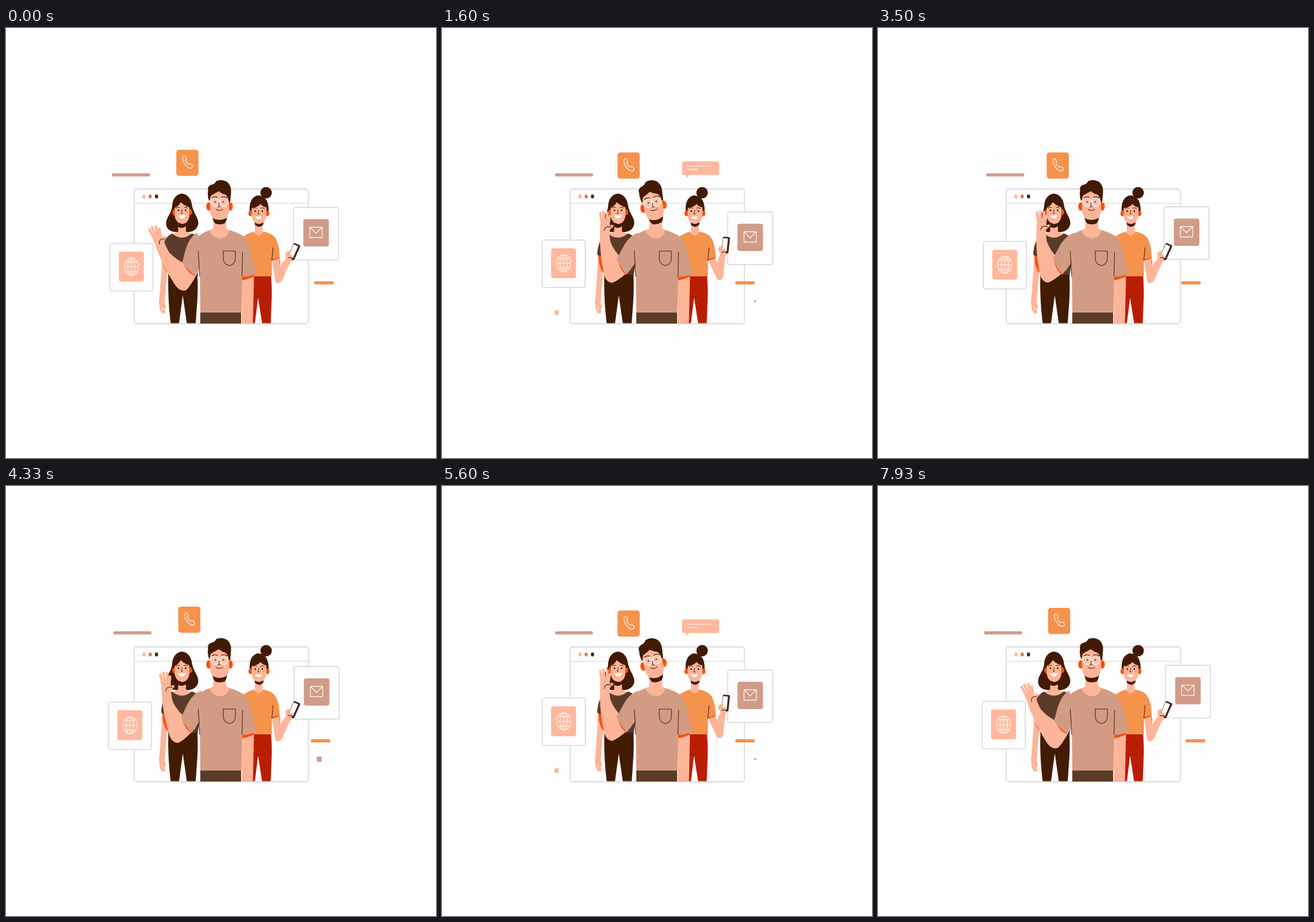
These frames come from a looping animation (748x748 px, 8.01 s). An HTML page:

```html
<!DOCTYPE html>
<html lang="en">
<head>
<meta charset="utf-8">
<title>Team greeting</title>
<style>
  html, body { margin: 0; width: 100%; height: 100%; overflow: hidden; background: #fefefe; }
  svg { display: block; width: 100vw; height: 100vh; }
  .skin { fill: #fdb599; }
  .hair { fill: #421a04; }
  .red { fill: #ff4e08; }
  .line { fill: none; stroke: #4a2412; stroke-width: 1.1; stroke-linecap: round; stroke-linejoin: round; }
  .white { fill: none; stroke: #fff3ec; stroke-width: 1.3; stroke-linecap: round; stroke-linejoin: round; }
  .limb { fill: none; stroke: #fdb599; stroke-linecap: round; stroke-linejoin: round; }
  .card { fill: #fdfdfd; stroke: #d3cfcf; stroke-width: 1.3; }
  .shirt { fill: #d29c84; }
  .top { fill: #5b3b2a; }
  .orange { fill: #f5924b; }
  .pants { fill: #ba1e02; }
  .pink { fill: #ffb89d; }
  .tan { fill: #d09c88; }
</style>
</head>
<body>
<svg viewBox="0 0 748 748">
  <!-- browser window -->
  <rect x="223" y="280" width="303" height="234.5" rx="4" fill="#fefefe" stroke="#d0cbcb" stroke-width="1.3"/>
  <path d="M223 305H526" stroke="#d8d0d0" stroke-width="1.2"/>
  <ellipse cx="240" cy="293" rx="2.8" ry="3.5" class="pink"/>
  <ellipse cx="250.8" cy="293" rx="2.8" ry="3.5" fill="#ee7740"/>
  <ellipse cx="261.8" cy="293" rx="2.8" ry="3.5" fill="#40261a"/>

  <!-- floating pieces -->
  <rect id="barL" y="252.8" width="66" height="5.4" rx="2" class="tan"/>
  <rect id="barR" y="440.5" width="34" height="5.4" rx="2" class="orange"/>
  <rect id="dotL" x="194.6" y="490" width="9.4" height="10.2" rx="2.5" class="pink"/>
  <rect id="dotR" x="540.7" y="470.5" width="8.4" height="9.6" class="tan"/>
  <g id="bubble">
    <path class="pink" d="M420 232H480Q482 232 482 234.500V253.500Q482 255.800 480 255.800H430L426 261L424.500 255.800H420Q417.500 255.800 417.500 253.500V234.500Q417.500 232 420 232Z"/>
    <path class="white" d="M426.500 240.300H469M426.500 246H443.500"/>
  </g>
  <g id="call">
    <rect width="38.500" height="45.500" rx="4.500" class="orange"/>
    <path class="white" d="M12.300 11Q10.200 13 11.200 17.500Q13.500 26.500 22 31.800Q25.800 33.500 28.300 30.300Q29.500 28.300 27.500 26.700L24.600 24.500Q23 23.700 21.600 25.800Q17.400 23 15.800 18.300Q18.200 17.100 17.100 14.900L15.500 11.800Q14 9.800 12.300 11Z"/>
  </g>
  <g id="mail">
    <rect class="card" width="78.500" height="91.500" rx="3.500"/>
    <rect x="17.200" y="20.600" width="44.400" height="47.400" rx="4" class="tan"/>
    <path class="white" d="M28.500 34.500H50V52.500H28.500ZL39.200 45L50 34.500"/>
  </g>

  <!-- woman on the left -->
  <g>
    <path class="hair" d="M306 288C296 289 290 297 289 309C289 322 278 329 278.500 341C279 350 287 355 297 355H318C328 354 335 347 334.500 338C334 329 325 320 323.500 308C322 296 315 289 306 288Z"/>
    <path class="skin" d="M299.500 334H313V354Q320 357 324 359Q306 371 288 359Q295 356 299.500 354Z"/>
    <path class="hair" d="M299.500 338H313V345Q306 350 299.500 346Z"/>
    <ellipse cx="292.500" cy="321" rx="3.400" ry="5" class="red"/>
    <ellipse cx="320.500" cy="320.500" rx="3.400" ry="5" class="red"/>
    <path class="skin" d="M293.500 313Q300 310 304 303Q310 309 319 312V327Q317 340 306.500 341Q295 339 293.500 327Z"/>
    <path class="line" d="M296.500 313Q299 310.800 302 312.500M310 312.500Q313 310.800 315.500 313M306.500 316L305 322.500H307"/>
    <circle cx="300" cy="317" r="1.500" class="hair"/><circle cx="312.500" cy="317" r="1.500" class="hair"/>
    <path d="M300 325.500Q306.500 327 312.500 325Q311 331.500 306.500 331.500Q302 331.500 300 325.500Z" fill="#fff"/>
    <path class="limb" stroke-width="10" d="M276 396L275.500 420L272.500 460L271 478"/>
    <path class="limb" stroke-width="3.800" d="M269 478L269 488L272 494.500M272 478L274 488L275.500 494.500M274 477L276.500 486"/>
    <path class="red" d="M272.500 396L279 400Q280 416 284 429Q276 423 273 408Z"/>
    <path class="top" d="M289 357.500Q306 372 323 357.500Q338 361 342 380L333 432H282.500Q283 414 280 398Q274 398 270 394Q271 366 289 357.500Z"/>
    <path d="M282.500 429H333Q334 450 333 470L330 513.500H314.500L307.500 465L301 513.500H286.500Q281 470 282.500 429Z" fill="#421b03"/>
    <path class="line" d="M279 388L281 402"/>
  </g>

  <!-- woman on the right -->
  <g>
    <path d="M424 430H461Q463 452 462 475L460.500 513.500H445.500L438.500 469L433 513.500H424Z" class="pants"/>
    <path d="M431 467.500H448" stroke="#8c1603" stroke-width="1"/>
    <path class="red" d="M470 398L475 398Q480 411 473.500 427Z"/>
    <path id="upperArm" class="limb" stroke-width="12.500"/>
    <path class="red" d="M462 399L475.500 395L475.500 400.500Q469 404 462 404.500Z"/>
    <path class="orange" d="M432 354H447Q466 357 471 370Q476 382 476 398Q469 402 462.500 402L462.500 432H412V364Q420 357 432 354Z"/>
    <path class="line" d="M464.500 382L462.500 404"/>
    <path class="skin" d="M433 336H446.500V354L448 355Q440 363 439 361Q434 359 430.500 355L433 354Z"/>
    <g id="head2">
      <circle cx="452.500" cy="286.500" r="10" class="hair"/>
      <path class="hair" d="M424 320Q422 297 436 291.500Q443 290 449 295Q457 300 457 320Z"/>
      <path class="hair" d="M432 333H447L448 341Q441 350 433 342Z"/>
      <ellipse cx="425.500" cy="322.500" rx="3.800" ry="5" class="red"/>
      <ellipse cx="454.500" cy="322.500" rx="3.800" ry="5" class="red"/>
      <path class="skin" d="M427.500 313Q438 312 443 306Q446 311 453 312V327Q451 340 440 341Q429 340 427.500 327Z"/>
      <path class="line" d="M430 314Q433 312 436 313.500M443 313.500Q446 312 449.500 314M439.500 317L438.500 323.500H440.500"/>
      <circle cx="433.500" cy="318.500" r="1.400" class="hair"/><circle cx="446" cy="318.500" r="1.400" class="hair"/>
      <path d="M429 318.500a4.500 5 0 1 0 9 0a4.500 5 0 1 0 -9 0M441.500 318.500a4.500 5 0 1 0 9 0a4.500 5 0 1 0 -9 0" fill="none" stroke="#f3a080" stroke-width=".7"/>
      <path d="M433.500 327.500Q439 329 445 327.500Q443.500 332.500 439.500 332.500Q435 332.500 433.500 327.500Z" fill="#fff"/>
    </g>
    <g id="phoneArm">
      <path class="skin" d="M467.500 438Q474 415 487 401L486 393Q489 387 494 388L501 397Q502 404 495 407Q488 420 482 436Q475 449 468 441Z"/>
      <g transform="rotate(24 501 389)">
        <rect x="494.800" y="374.800" width="12.400" height="28.400" rx="2" fill="#45291d"/>
        <rect x="495.400" y="377.500" width="8.400" height="22.500" rx=".6" fill="#fff"/>
      </g>
      <path class="limb" stroke-width="3.800" d="M488 392L494.500 390M489 397L496.500 396.500M491 402L495 402"/>
    </g>
  </g>

  <!-- man in front -->
  <g>
    <g id="wave">
      <path class="skin" d="M274.500 346Q273.500 370 276 393Q279 416 283 432Q287 443 296 444Q305 442 328 421L337 404L311 399Q300 390 292.500 372Q290 360 291.500 348Z"/>
      <ellipse cx="283" cy="346" rx="9" ry="9.500" class="skin"/>
      <path class="limb" stroke-width="4.600" d="M278 346L274.300 323M281.500 343L280 320.800M285 343L286.500 322M288 345L290.800 328M288 351.500L295 345"/>
      <path class="line" d="M281.500 353Q282.500 346.500 288 346L293.500 347"/>
    </g>
    <path class="skin" d="M410.500 428H431.500Q430.500 470 429.500 514H410Z"/>
    <path class="red" d="M410.500 430L432.500 426L430.500 433Q421 437 410.500 439Z"/>
    <path class="red" id="cuff" d="M305 399L309.500 399L322 422L319.500 429Q308 419 305 399Z"/>
    <path class="shirt" id="sleeve" d="M341 356Q325 362 315 381L304 402Q312 418 321 429L338 407L344 380Z"/>
    <path d="M338 490H409V514H338Z" fill="#5b3c28"/>
    <path class="shirt" d="M357 350.500Q371 354 386 350.500Q408 357 418 366Q426 380 435 428Q424 432.500 411 433L409.500 495H338L337 410L326 371Q337 357 357 350.500Z"/>
    <path class="line" d="M334.500 388L337 432M411.500 390L410.500 432"/>
    <path class="line" d="M378 388H399V402Q398 411 388.500 413.500Q379 411 378 402Z"/>
    <path class="skin" d="M360.500 330H383V348Q386 351 389 352Q385 365 372 366Q358 364 354 352Q360 350 360.500 348Z"/>
    <g id="head1">
      <ellipse cx="353" cy="310.500" rx="4.600" ry="7.300" class="red"/>
      <ellipse cx="390" cy="310.500" rx="4.600" ry="7.300" class="red"/>
      <path class="hair" d="M358 322H385Q385 335 380 340Q371 343 364 340Q359 335 358 322Z"/>
      <path class="skin" d="M355 284H388V318Q387 326 383 331Q371 337 360 331Q356 326 355 318Z"/>
      <path class="hair" d="M353 300Q350 291 351.500 283Q350 276 356 273Q363 272 366 266Q376 262 385 268Q392 274 391.500 285L390 303H387.500Q387 294 382 290Q375 288 370 284Q363 288 357 291Q354.500 295 354.500 300Z"/>
      <path class="hair" d="M358 295Q362 291.500 368 294L367.500 296Q362 294 358.500 297ZM374.500 294Q380 291.500 385 295L384.500 297Q380 294.500 375 296Z"/>
      <circle cx="364" cy="302.500" r="1.600" class="hair"/><circle cx="378" cy="302.500" r="1.600" class="hair"/>
      <path fill="#ffe4d8" fill-opacity=".3" stroke="#fbe9df" stroke-width="1.700" d="M356.500 302.800a7 7.600 0 1 0 14 0a7 7.600 0 1 0 -14 0M372 302.800a7 7.600 0 1 0 14 0a7 7.600 0 1 0 -14 0"/>
      <path class="line" d="M371 304L369.500 311H372.500M365.500 315.500Q371 319 377 315.500"/>
    </g>
  </g>

  <g id="globe">
    <rect class="card" width="75" height="82.500" rx="3.500"/>
    <rect x="15.500" y="14.300" width="43.500" height="52" rx="4" class="pink"/>
    <path class="white" d="M25 40.500a12.300 15 0 1 0 24.600 0a12.300 15 0 1 0 -24.600 0M31 40.500a6.300 15 0 1 0 12.600 0a6.300 15 0 1 0 -12.600 0M37.300 25.500V55.500M25 40.500H49.600M27.500 32H47M27.500 49H47"/>
  </g>
</svg>
<script>
  const LOOP = 8010, CYCLE = 80, TAU = Math.PI * 2;
  const el = id => document.getElementById(id);
  const set = (id, name, value) => el(id).setAttribute(name, value);
  const clamp = v => Math.min(1, Math.max(0, v));
  const smooth = v => { v = clamp(v); return v * v * (3 - 2 * v); };
  const bump = (n, a, b, c, d) => smooth((n - a) / (b - a)) * (1 - smooth((n - c) / (d - c)));

  // Elliptical drift: centre plus cosine and sine weights for each axis.
  const drifts = {
    call: [299.6, -3.3, 5.4, 216, -4.35, -5.09],
    globe: [178.6, 2.2, -4.4, 370.5, 4.3, 3.1],
    mail: [497.4, 2.6, 2.6, 315.5, -3.5, 2.85]
  };

  // Each 100 ms holds two pictures, lasting 30 and 70 ms.
  function stepAt(time) {
    const t = time % LOOP;
    return Math.min(159, Math.floor(t / 100) * 2 + (t % 100 >= 30 ? 1 : 0)) % CYCLE;
  }

  function scaleAt(id, s, x, y) {
    set(id, "transform", `translate(${x} ${y}) scale(${s}) translate(${-x} ${-y})`);
  }

  function draw(n) {
    const cos = Math.cos(TAU * n / CYCLE), sin = Math.sin(TAU * n / CYCLE);
    for (const id in drifts) {
      const [x, xc, xs, y, yc, ys] = drifts[id];
      set(id, "transform", `translate(${x + xc * cos + xs * sin} ${y + yc * cos + ys * sin})`);
    }

    const slide = n < 41 ? n / 41 : (80 - n) / 39;
    set("barL", "x", 184.3 + 15.9 * slide);
    set("barR", "x", 536 - 33.3 * slide);

    // The hand waves once every 20 steps.
    const m = n % 20, peak = 10.7;
    const off = m < peak ? (peak - m) / peak : (m - peak) / (20 - peak);
    const swing = (1 + Math.cos(Math.PI * off)) / 2 / 0.92 - 1;
    set("wave", "transform", `rotate(${20.7 * swing} 338 405)`);
    for (const id of ["sleeve", "cuff"]) set(id, "transform", `rotate(${13 * swing} 335 395)`);

    set("head1", "transform", `rotate(${-11 * bump(n, 18, 27, 36, 46)} 371 329)`);
    set("head2", "transform", `rotate(${8 * bump(n, 40, 50, 56, 66)} 440 345)`);

    const lift = bump(n, 17, 27, 36, 46);
    set("phoneArm", "transform", `translate(${9.5 * lift} ${-6 * lift}) rotate(${-18 * lift} 475 440)`);
    set("upperArm", "d", `M469 402L${474 + 9 * lift} ${437 - 5 * lift}`);

    scaleAt("bubble", bump(n, 13, 20, 60, 68), 426, 258);
    scaleAt("dotL", bump(n, 17, 22, 60, 68) * (0.82 + 0.18 * smooth((n - 39) / 9)), 199.3, 495.1);
    const dot = n < 38 ? bump(n, 0, 6, 24, 38) : bump(n, 38, 47, 60, 72);
    scaleAt("dotR", dot, 544.9, 475.3);
    set("dotR", "rx", n < 20 ? 1.8 : 4.2);
  }

  function tick(now) {
    draw(stepAt(now));
    requestAnimationFrame(tick);
  }
  draw(0);
  requestAnimationFrame(tick);
</script>
</body>
</html>
```
